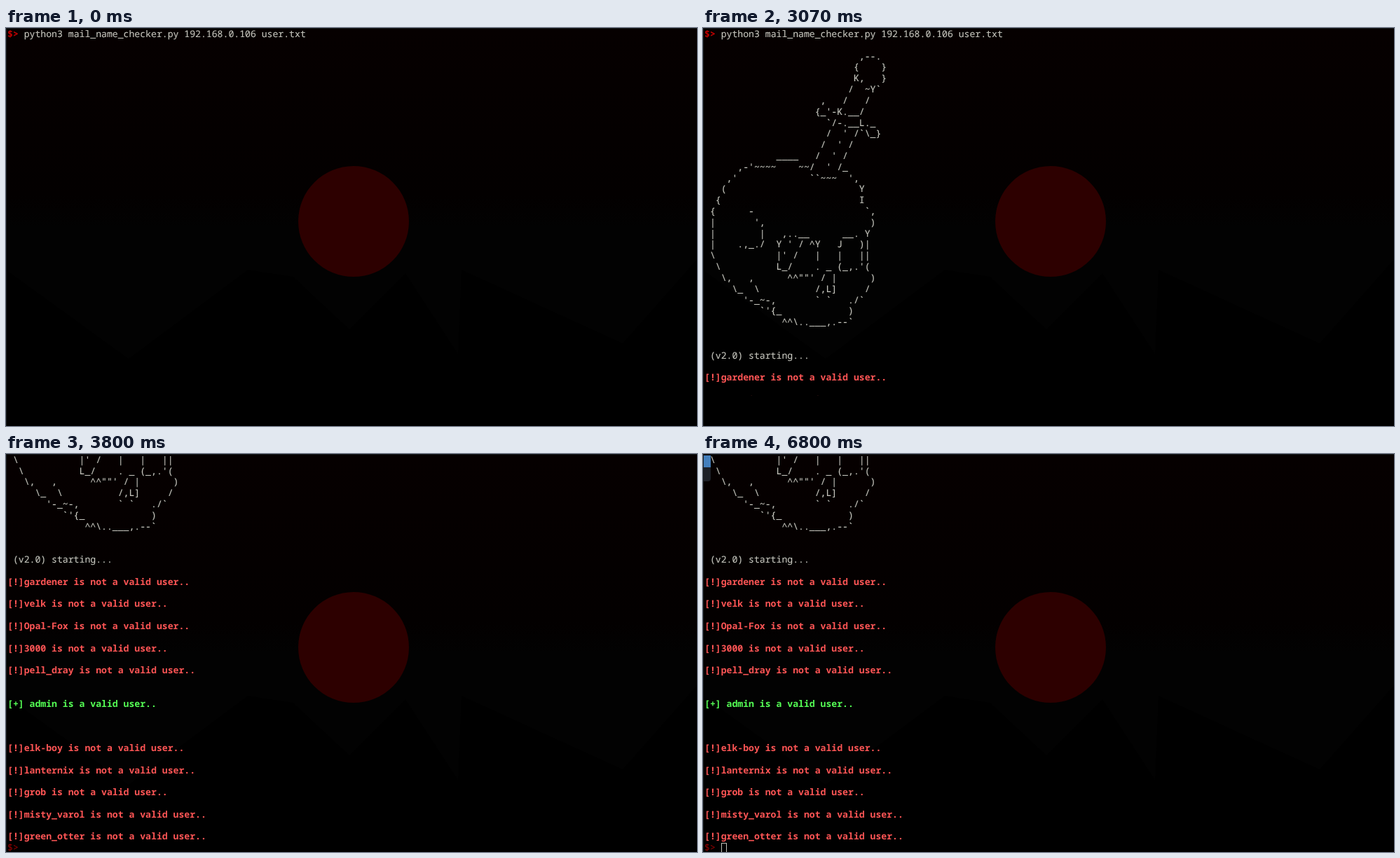
An HTML page for the animation above (7.14 s loop, 986 by 568 pixels).

```html
<!DOCTYPE html>
<html lang="en">
<head>
<meta charset="utf-8">
<title>Terminal session</title>
<style>
  :root { --cw: 7.89px; --lh: 15.82px; --loop: 7140ms step-end infinite; }
  html, body { margin: 0; width: 100%; height: 100%; overflow: hidden; background: #000; }

  #term {
    --row: 0;
    --col: 54;
    position: relative;
    width: 986px;
    height: 568px;
    overflow: hidden;
    background: #000;
    animation: output var(--loop);
  }
  /* Faint faceted wallpaper, then the window edge. */
  #term::before, #term::after { content: ""; position: absolute; inset: 0; }
  #term::before {
    background: linear-gradient(#060000, #030000 42%, #020202 50%);
    clip-path: polygon(0 0, 986px 0, 986px 330px, 880px 450px, 650px 345px,
      645px 465px, 570px 350px, 490px 430px, 410px 355px, 345px 345px, 175px 472px, 0 345px);
  }
  #term::after { border: solid #15191c; border-width: 1px 0 0 1px; }

  #emblem {
    position: absolute;
    left: 417px;
    top: 197px;
    width: 158px;
    height: 158px;
    border-radius: 50%;
    background: #2d0000;
  }

  /* The page follows the cursor row and scrolls once it passes row 35. */
  #page {
    position: absolute;
    left: 2px;
    top: calc(1px - max(0, var(--row) - 35) * var(--lh));
    color: #c4c4bc;
  }
  pre {
    margin: 0;
    width: 980px;
    height: calc((var(--row) + 1) * var(--lh) + 2px);
    overflow: hidden;
    font: 500 13.15px/var(--lh) "Noto Sans Mono", monospace;
    font-variant-ligatures: none;
    text-rendering: geometricPrecision;
    -webkit-text-stroke: .15px;
  }
  b { color: #ff5555; -webkit-text-stroke: 0; }
  b.ok { color: #55ff55; }
  i { font-style: normal; font-weight: bold; color: #c00000; }
  i.dim { font-weight: normal; color: #8c0000; }

  #cursor {
    position: absolute;
    left: calc(var(--col) * var(--cw));
    top: calc(var(--row) * var(--lh));
    width: 8px;
    height: 16px;
    background: #c0c0b8;
    box-shadow: inset 0 0 0 1px #c0c0b8;
    animation: blink var(--loop);
  }

  #menu {
    position: absolute;
    left: 0;
    top: 2px;
    width: 11px;
    height: 37px;
    border-radius: 0 0 4px 0;
    background: #1d2027;
    animation: open var(--loop);
  }
  #menu div { height: 17px; background: #4580bd; animation: hover var(--loop); }

  @keyframes output {
    0%     { --row: 0; --col: 54; }
    28.99% { --row: 28; --col: 0; }
    42.99% { --row: 32; --col: 0; }
    43.83% { --row: 36; --col: 0; }
    44.81% { --row: 40; --col: 0; }
    45.79% { --row: 47; --col: 0; }
    46.63% { --row: 51; --col: 0; }
    47.61% { --row: 53; --col: 0; }
    48.59%, 100% { --row: 55; --col: 3; }
  }
  @keyframes blink {
    0%, 15.82%, 36.41%, 53.22%, 70.02%, 86.83% { opacity: 0; background: #c0c0b8; }
    7.42%, 24.22%, 44.81%, 61.62%, 78.43% { opacity: 1; background: #c0c0b8; }
    87.81%, 100% { opacity: 1; background: transparent; }
  }
  @keyframes open {
    0% { opacity: 0; }
    87.81% { opacity: .5; }
    88.65%, 100% { opacity: 1; }
  }
  @keyframes hover {
    0% { opacity: 0; }
    95.23%, 100% { opacity: 1; }
  }
</style>
</head>
<body>
<div id="term">
<div id="emblem"></div>
<div id="page">
<pre>
<i>$></i> python3 mail_name_checker.py 192.168.0.106 user.txt

                            ,--.
                           {    }
                           K,   }
                          /  ~Y`
                     ,   /   /
                    {_'-K.__/
                      `/-.__L._
                      /  ' /`\_}
                     /  ' /
             ____   /  ' /
      ,-'~~~~    ~~/  ' /_
    ,'             ``~~~  ',
   (                        Y
  {                         I
 {      -                    `,
 |       ',                   )
 |        |   ,..__      __. Y
 |    .,_./  Y ' / ^Y   J   )|
 \           |' /   |   |   ||
  \          L_/    . _ (_,.'(
   \,   ,      ^^""' / |      )
     \_  \          /,L]     /
       '-_~-,       ` `   ./`
          `'{_            )
              ^^\..___,.--`


 (v2.0) starting...

<b>[!]gardener is not a valid user..</b>

<b>[!]velk is not a valid user..</b>

<b>[!]Opal-Fox is not a valid user..</b>

<b>[!]3000 is not a valid user..</b>

<b>[!]pell_dray is not a valid user..</b>


<b class="ok">[+] admin is a valid user..</b>



<b>[!]elk-boy is not a valid user..</b>

<b>[!]lanternix is not a valid user..</b>

<b>[!]grob is not a valid user..</b>

<b>[!]misty_varol is not a valid user..</b>

<b>[!]green_otter is not a valid user..</b>
<i class="dim">$></i>
</pre>
<div id="cursor"></div>
</div>
<div id="menu"><div></div></div>
</div>
</body>
</html>
```
